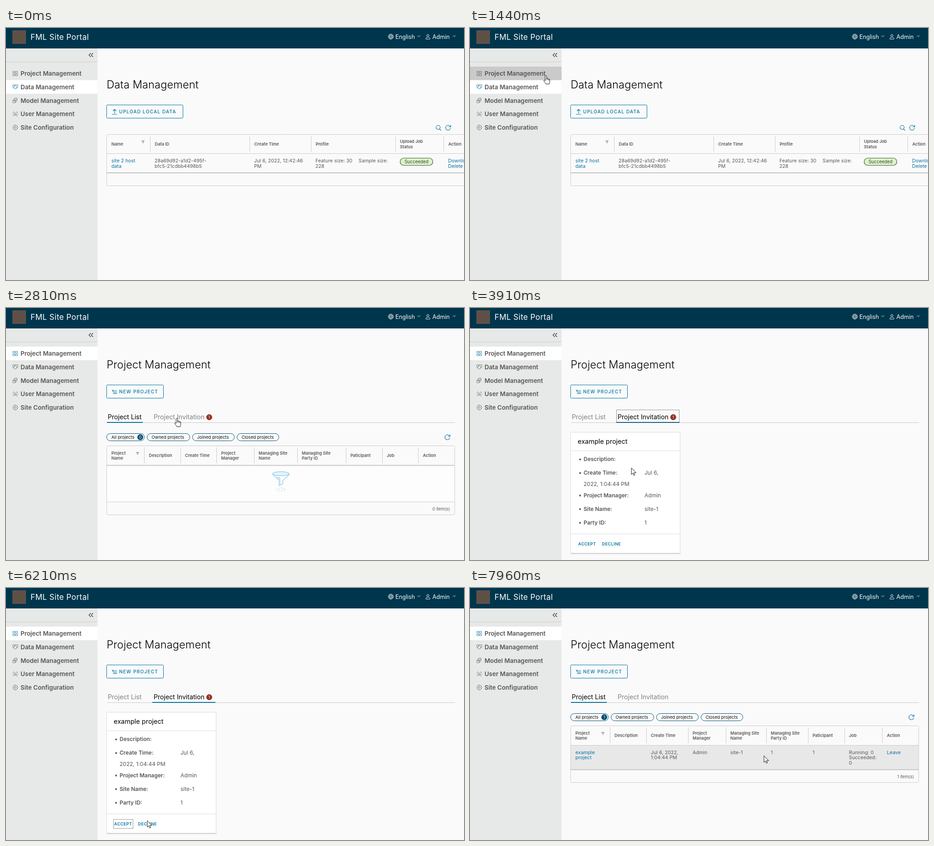
These frames come from a looping animation (1008 by 555 pixels, 8000 ms). An HTML page with a canvas:

```html
<!DOCTYPE html>
<html lang="en">
<head>
<meta charset="utf-8">
<title>Site portal</title>
<style>
html, body { margin: 0; width: 100%; height: 100%; overflow: hidden; background: #fafafa; }
canvas { display: block; width: 1008px; height: 555px; }
</style>
</head>
<body>
<canvas id="stage"></canvas>
<script>
const W = 1008, H = 555, LOOP = 8000, STEP = 70;
const BLUE = '#0072a3', DEEP = '#00537a', INK = '#565656', LINE = '#cccccc', PAGE = '#fafafa';
const canvas = document.getElementById('stage');
const c = canvas.getContext('2d');
const dpr = window.devicePixelRatio || 1;
canvas.width = W * dpr;
canvas.height = H * dpr;

// Moments at which the state of the page changes
const T = { enter: 460, open: 1580, listed: 1750, tab: 2950, focus: 4460, accepted: 6490, loading: 6630, loaded: 7330 };
// Ticks restart from these times
const anchors = [0, 460, 1980, 2810, 3630, 5390, 5790];
// Pointer path: time, x, y
const path = [
  [460, 620, 519], [670, 425, 345], [880, 247, 214], [1230, 178, 132], [1370, 167, 105],
  [1980, 167, 105], [2050, 168, 105], [2300, 215, 150], [2550, 290, 200], [2740, 335, 242],
  [2810, 376, 243], [3630, 376, 243], [3980, 350, 380], [4390, 261, 521], [5320, 261, 521],
  [5390, 264, 522], [5790, 264, 522], [6560, 350, 505], [7120, 572, 339], [7400, 596, 325], [7960, 647, 370]
];

function pointerAt(t) {
  const i = path.findIndex(p => p[0] >= t);
  if (i < 0) return path[path.length - 1].slice(1);
  if (i === 0) return path[0].slice(1);
  const [t0, x0, y0] = path[i - 1], [t1, x1, y1] = path[i];
  const k = (t - t0) / (t1 - t0);
  return [x0 + (x1 - x0) * k, y0 + (y1 - y0) * k];
}

function tick(t) {
  const a = anchors.filter(v => v <= t).pop();
  return a + Math.floor((t - a) / STEP) * STEP;
}

function text(s, x, y, size, color = INK, weight = 400, spacing = 0, align = 'left') {
  c.font = `${weight} ${size}px Inter, "Open Sans", sans-serif`;
  c.letterSpacing = spacing + 'px';
  c.textAlign = align;
  c.fillStyle = color;
  s.split('\n').forEach((row, i) => c.fillText(row, x, y + i * 11.5));
}

function rect(x, y, w, h, color) {
  c.fillStyle = color;
  c.fillRect(x, y, w, h);
}

function box(x, y, w, h, r, stroke, fill, width = 1) {
  c.beginPath();
  c.roundRect(x, y, w, h, r);
  if (fill) { c.fillStyle = fill; c.fill(); }
  c.strokeStyle = stroke;
  c.lineWidth = width;
  c.stroke();
}

function dot(x, y, r, color) {
  c.beginPath();
  c.arc(x, y, r, 0, 7);
  c.fillStyle = color;
  c.fill();
}

// Strokes SVG path data at a position
function icon(d, x, y, color, width = 1, fill) {
  const p = new Path2D(d);
  c.save();
  c.translate(x, y);
  c.lineJoin = c.lineCap = 'round';
  if (fill) { c.fillStyle = fill; c.fill(p); }
  c.strokeStyle = color;
  c.lineWidth = width;
  c.stroke(p);
  c.restore();
}

function dotted(x, y, w, h) {
  c.setLineDash([1, 1]);
  box(x, y, w, h, 0, '#333');
  c.setLineDash([]);
}

const shapes = {
  grid: 'M-5-4.5h4v3.5h-4zM1-4.5h4v3.5h-4zM-5 1.5h4v3.5h-4zM1 1.5h4v3.5h-4z',
  data: 'M-2-2.5v-2h-3.5v5l2 1.500M1-4.500h4.500v5l-2 1.500M-2-4.500h3M-3-1l3-1.500 3 1.500v4l-3 1.500-3-1.500z',
  model: 'M-2-5h6v6h-6zM-5-1h6v6h-6zM-3 2h2M1-3h1.5',
  users: 'M-2 0a2 2 0 1 1 4 0a2 2 0 1 1-4 0M-4 5c0-4 8-4 8 0M-5-2.5a1.5 1.5 0 1 1 3-1M2-3.5a1.5 1.5 0 1 1 3 1M-5.5 2l2-2M5.5 2l-2-2',
  gear: 'M-1-5.5h2l.6 1.5 1.6-.6 1.4 1.4-.6 1.6 1.5.6v2l-1.5.6.6 1.6-1.4 1.4-1.6-.6-.6 1.5h-2l-.6-1.5-1.6.6-1.4-1.4.6-1.6-1.5-.6v-2l1.5-.6-.6-1.6 1.4-1.4 1.6.6zM-2 0a2 2 0 1 0 4 0a2 2 0 1 0-4 0',
  globe: 'M-5.5 0a5.5 5.5 0 1 0 11 0a5.5 5.5 0 1 0-11 0M-5.5 0h11M-4.7-2.7h9.4M-4.7 2.7h9.4M0-5.5c-3.5 3-3.5 8 0 11c3.5-3 3.5-8 0-11',
  person: 'M-2.3-2.5a2.3 2.3 0 1 0 4.6 0a2.3 2.3 0 1 0-4.6 0M-4.5 5v-1.5c1-3 8-3 9 0v1.5z',
  caret: 'M-2.5-1.2l2.5 2.5 2.5-2.5',
  fold: 'M-.5-4l-4 4 4 4M4.5-4l-4 4 4 4',
  upload: 'M0 3v-8.5M-3.5-2l3.5-3.5 3.5 3.5M-5 5.5h10',
  add: 'M-5.5-2.5h4M-3.5-4.5v4M0-2.5h5M-3 .7h8M-3 3.9h8',
  search: 'M-5.5-1a4.5 4.5 0 1 0 9 0a4.5 4.5 0 1 0-9 0M2.2 2.3l3.3 3.3',
  refresh: 'M5.2 1.2a5.4 5.4 0 1 1-1.3-4.7l1.5 1.7M5.7-5.5v3.8h-3.8',
  filter: 'M-3.5-3h7l-2.7 3v3l-1.6-1v-2z',
  arrow: 'M0 0v14l3.3-3 2.2 5 2.2-1-2.2-4.8h4.5z',
  hand: 'M-1.7 1.2c0-2 3.3-2 3.3 0v5c.8-.9 2.4-.6 2.6.5c.9-.7 2.2-.2 2.4.8c1-.5 2 .1 2 1.3v4c0 2-1.2 3-1.2 5.5h-7.4c-.6-2.3-2.8-3.5-4.3-6.5c-1-2 .8-3 2.6-1zM1.6 6v3M4.2 7v2.5M6.6 8v2'
};

function header() {
  rect(0, 0, W, 45, '#00364d');
  rect(14, 5, 30, 30, '#5e5047');
  text('FML Site Portal', 54, 25.5, 17.2, '#fff', 400, .35);
  icon(shapes.globe, 847, 19, '#e8eef0', .9);
  text('English', 857, 23.5, 12.6, '#fff');
  icon(shapes.caret, 908.5, 18, '#e8eef0');
  icon(shapes.person, 928.5, 19, '#e8eef0');
  text('Admin', 938.5, 23.5, 12.6, '#fff');
  icon(shapes.caret, 986.5, 18, '#e8eef0');
}

function sidebar(active, hover) {
  rect(0, 45, 201.5, H, '#e7e8e8');
  icon(shapes.fold, 187, 59.5, '#333', 1.1);
  rect(0, 74, 201.5, 1, '#cfcfcf');
  const items = [['Project', 'grid'], ['Data', 'data'], ['Model', 'model'], ['User', 'users'], ['Site', 'gear']];
  items.forEach(([name, shape], i) => {
    const top = 85 + i * 29.8;
    if (i === hover) rect(0, top, 201.5, 30, '#cacaca');
    else if (i === active) rect(0, top, 201.5, 30, '#fff');
    icon(shapes[shape], 20.5, top + 15, i === active ? BLUE : '#666', .8);
    text(name + (i === 4 ? ' Configuration' : ' Management'), 32, top + 20, 13.4, INK, 600);
  });
}

function pageTitle(s) {
  text(s, 221.5, 133, 23.5, '#000', 300, .15);
}

function button(label, shape, w, hover) {
  box(221.5, 169.5, w, 29, 2, BLUE, hover ? '#e3f1f7' : null);
  icon(shapes[shape], 239, 184.5, BLUE, 1.1);
  text(label, 249, 188, 10.1, BLUE, 500, 1.17);
}

function columns(labels, xs, top, bottom, mid) {
  labels.forEach((label, i) => {
    if (i) rect(Math.round(xs[i] - 10.5), top, 1, bottom - top, LINE);
    text(label, xs[i], label.includes('\n') ? mid - 5.5 : mid, 9.2, INK, 600);
  });
}

function cell(s, x, y, color = INK) {
  text(s, x, y, 10.6, color, 400, .08);
}

function dataPage(hover) {
  pageTitle('Data Management');
  button('UPLOAD LOCAL DATA', 'upload', 168);
  icon(shapes.search, 952, 220, BLUE, 1.1);
  icon(shapes.refresh, 973, 219.5, BLUE, 1.1);
  box(221.5, 234.5, 820, 113, 3, LINE, PAGE);
  columns(['Name', 'Data ID', 'Create Time', 'Profile', 'Upload Job\nStatus', 'Action'],
    [232, 327.5, 546.5, 681.5, 867, 973.5], 239, 272, 258.5);
  icon(shapes.filter, 301.5, 251, '#aaa', .6, '#aaa');
  if (hover) rect(222, 276, W, 43, '#e8e8e8');
  rect(222, 276, W, 1, LINE);
  rect(222, 318, W, 2, '#c4c4c4');
  cell('site 2 host\ndata', 232, 296, BLUE);
  cell('28a69d92-a1d2-495f-\nbfc5-21cdbb4498b5', 327, 296);
  cell('Jul 6, 2022, 12:42:46\nPM', 546, 296);
  cell('Feature size: 30\n228', 681, 296);
  cell('Sample size:', 776, 296);
  cell('Download\nDelete', 973, 296, BLUE);
  box(867.5, 286.5, 72, 16, 8, '#2f661a', '#dff0d0', 1.2);
  text('Succeeded', 903.5, 298, 9.7, '#2d4b1f', 400, .1, 'center');
}

function tabs(active, badge, focus) {
  rect(222, 252, 766, 1, '#c8c8c8');
  text('Project List', 224, 244.5, 14.15, active ? '#808080' : '#000');
  text('Project Invitation', 325, 244.5, 14.15, active ? '#000' : '#808080');
  if (active) rect(322, 251, 139, 2, BLUE);
  else rect(222, 251, 79, 2, BLUE);
  if (badge) {
    dot(447.3, 240.5, 6.4, '#962d22');
    text('1', 447.3, 243.5, 8.5, '#fff', 400, 0, 'center');
  }
  if (focus) dotted(322.5, 224.5, 138, 28);
}

function pills(count) {
  [['All projects', 221, 84, 232], ['Owned projects', 310, 95, 320.5],
   ['Joined projects', 410, 93, 420.5], ['Closed projects', 508, 93, 518.5]].forEach(([s, x, w, tx]) => {
    box(x + .5, 276.5, w - 1, 16, 8, DEEP);
    text(s, tx, 288, 9.6, '#111');
  });
  dot(295.5, 284.5, 6.4, '#004d73');
  text(count, 295.5, 287.8, 8.8, '#fff', 400, 0, 'center');
  icon(shapes.refresh, 971.5, 284.5, BLUE, 1.1);
}

function funnel() {
  const sky = '#74bfe2';
  icon('M-18-10c0 7 14 11 14 16v10l8-4v-6c0-5 14-9 14-16z', 605, 375, sky, 1.1, '#fff');
  icon('M-15-5c4 2 9 3 13 3l1 9v7l-3 1v-9c0-4-7-6-11-11z', 605, 375, '#c5e4f2', .5, '#c5e4f2');
  icon('M-18-10a18 4.5 0 1 0 36 0a18 4.5 0 1 0-36 0', 605, 375, sky, 1.1, '#e4f3fa');
  c.setLineDash([4, 2.5]);
  c.beginPath();
  c.ellipse(605, 399.5, 10, 3, 0, 0, 7);
  c.strokeStyle = '#a5dcd5';
  c.lineWidth = 1;
  c.stroke();
  c.setLineDash([]);
}

function spinner(t) {
  const a = (t - 7120) / 1000 * Math.PI * 2 - 2.75;
  c.lineWidth = 2.6;
  c.strokeStyle = '#cfcfcf';
  c.beginPath();
  c.arc(605, 339.5, 13.7, 0, 7);
  c.stroke();
  c.strokeStyle = '#25789f';
  c.beginPath();
  c.arc(605, 339.5, 13.7, a, a + 2.4);
  c.stroke();
}

// mode: 'empty', 'loading' or 'row'
function projectTable(mode, hover, t) {
  const row = mode === 'row';
  const bottom = { empty: 455.5, loading: 375.5, row: 428.5 }[mode];
  const xs = row ? [232, 318, 398, 490, 573, 662, 754, 834, 917.5] : [232, 314.5, 394, 473.5, 556, 651, 758, 838, 917.5];
  c.globalAlpha = mode === 'loading' ? .4 : 1;
  box(221.5, 303.5, 766, bottom - 303.5, 3, LINE, PAGE);
  if (mode === 'empty') rect(222, 347, 765, 80, '#fdfdfd');
  columns(['Project\nName', 'Description', 'Create Time', 'Project\nManager', 'Managing Site\nName',
    'Managing Site\nParty ID', 'Paticipant', 'Job', 'Action'], xs, 307, 342, 328);
  icon(shapes.filter, row ? 292.5 : 289.5, 320.5, '#aaa', .6, '#aaa');
  if (hover) rect(222, 347, 765, 53, '#e8e8e8');
  rect(222, row ? 346 : 345.7, 765, row ? 1 : 1.8, row ? LINE : '#c4c4c4');
  if (mode === 'empty') {
    funnel();
    rect(222, 426.5, 765, 1, LINE);
  }
  if (row) {
    rect(222, 399.3, 765, 1.8, '#c4c4c4');
    const cells = ['example\nproject', '', 'Jul 6, 2022,\n1:04:44 PM', 'Admin', 'site-1', '1', '1', 'Running: 0\nSucceeded:\n0', 'Leave'];
    cells.forEach((s, i) => cell(s, xs[i], 365.5, i % 8 ? INK : BLUE));
  }
  text((row ? 1 : 0) + ' item(s)', 977, bottom - 10, 9.2, INK, 400, 0, 'right');
  c.globalAlpha = 1;
  if (mode === 'loading') spinner(t);
}

function card(hover, focus) {
  box(221.5, 273.5, 241, 267, 2, '#d8d8d8', '#fff');
  rect(221.5, 539.5, 241.5, 2.5, '#d4d4d4');
  rect(222, 314, 240, 1, '#dcdcdc');
  rect(222, 497, 240, 1, '#dcdcdc');
  text('example project', 237, 298.5, 14.5, '#000');
  [['Description:', '', 337], ['Create Time:', 'Jul 6,', 367], ['Project Manager:', 'Admin', 416.5],
   ['Site Name:', 'site-1', 446.5], ['Party ID:', '1', 476.5]].forEach(([label, value, y]) => {
    dot(242.3, y - 3.5, 2, INK);
    text(label, 250, y, 12, INK, 600);
    text(value, 384, y, 12);
  });
  text('2022, 1:04:44 PM', 250, 391.5, 12);
  text('ACCEPT', 238, 522.5, 9, hover ? '#004a70' : BLUE, 600, .45);
  text('DECLINE', 290.5, 522.5, 9, BLUE, 600, .45);
  if (focus) dotted(236.5, 509.5, 43, 20);
}

function draw(t) {
  c.setTransform(dpr, 0, 0, dpr, 0, 0);
  rect(0, 0, W, H, PAGE);
  const shown = t >= T.enter;
  const [x, y] = shown ? pointerAt(t) : [-99, -99];
  const over = (l, top, r, b) => x >= l && x < r && y >= top && y < b;
  const onMenu = over(0, 85, 201, 234);
  const projects = t >= T.open;
  const invites = t >= T.tab && t < T.accepted;
  const onButton = projects && over(221, 169, 346, 199);
  const onTab = projects && over(322, 224, 461, 253);
  const onAccept = invites && over(236, 509, 280, 530);

  header();
  sidebar(projects ? 0 : 1, onMenu ? Math.floor((y - 85) / 29.8) : -1);
  if (!projects) {
    dataPage(over(222, 276, W, 319));
  } else {
    pageTitle('Project Management');
    button('NEW PROJECT', 'add', 125, onButton);
    tabs(invites ? 1 : 0, t < T.accepted, invites && t < T.focus);
    if (invites) {
      card(onAccept, t >= T.focus);
    } else {
      pills(t >= T.loaded ? '1' : '0');
      if (t < T.listed) projectTable('loading', false, t);
      else if (t < T.tab) projectTable('empty');
      else if (t >= T.loaded) projectTable('row', over(222, 347, 987, 400));
      else if (t >= T.loading) projectTable('loading', false, t);
    }
  }
  if (shown) {
    const hand = onMenu || onButton || onTab || onAccept;
    icon(hand ? shapes.hand : shapes.arrow, x, y, '#111', 1, '#fff');
  }
}

function loop(now) {
  draw(tick(now % LOOP));
  requestAnimationFrame(loop);
}
requestAnimationFrame(loop);
</script>
</body>
</html>
```
